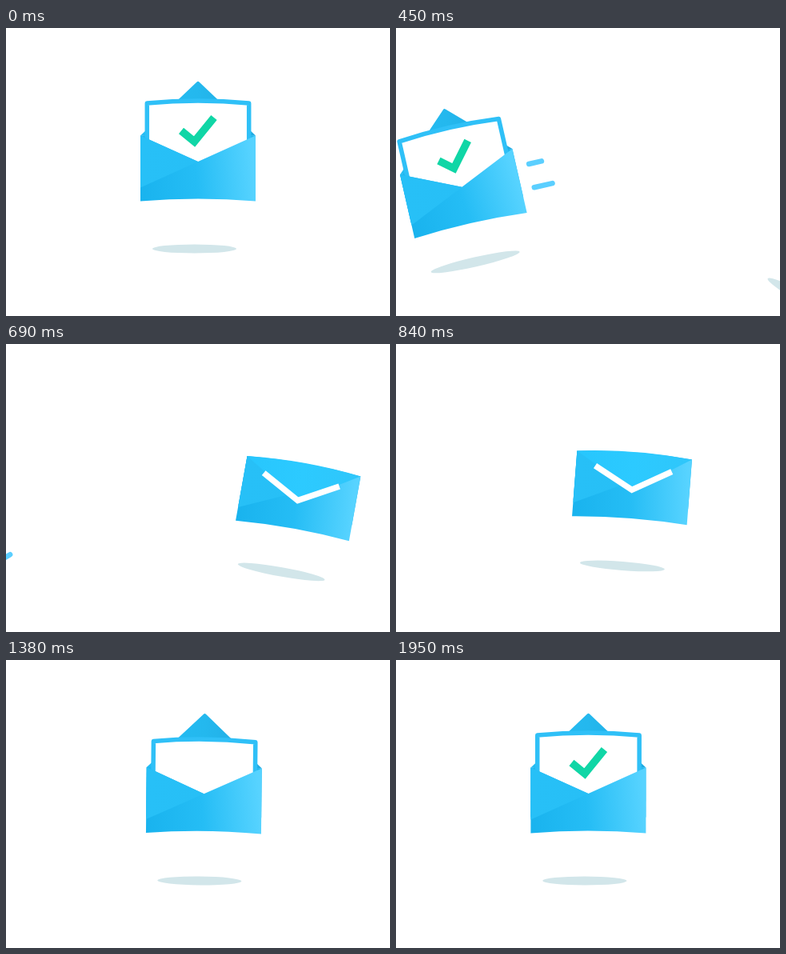
An HTML page with a canvas that plays this animation: 480 px wide and 360 px high, repeating every 1980 ms.

```html
<!DOCTYPE html>
<html>
<head>
<meta charset="utf-8">
<style>
html, body { margin: 0; width: 100%; height: 100%; overflow: hidden; background: #fff; }
canvas { display: block; }
</style>
</head>
<body>
<canvas id="stage" width="480" height="360"></canvas>
<script>
const ctx = document.getElementById('stage').getContext('2d');
const LOOP = 1980, SWAP = 540, GAP = 41.4;
const PIVOT_X = 240, PIVOT_Y = 890, BASE_Y = 216.5;

const ramp = (t, a, b) => Math.min(1, Math.max(0, (t - a) / (b - a)));
const smooth = p => p * p * (3 - 2 * p);
const mix = (a, b, p) => a + (b - a) * p;

function gradient(x0, y0, x1, y1, ...colors) {
  const g = ctx.createLinearGradient(x0, y0, x1, y1);
  colors.forEach((c, i) => g.addColorStop(i / (colors.length - 1), c));
  return g;
}
const bodyFill = gradient(-72, 0, 72, -12, '#19b3ee', '#25bdf5', '#57d3ff');
const sideFill = gradient(-72, 0, 0, 0, '#27c0f7', '#27bff6');
const flapFill = gradient(-72, 0, 72, 0, '#24bdf4', '#24b8ee', '#1fa9e1');
const lidFill = gradient(-72, 0, 72, 0, '#27c6fd', '#2ccaff', '#2fc6fa');

function poly(fill, ...pts) {
  ctx.beginPath();
  pts.forEach(p => p.length > 2 ? ctx.quadraticCurveTo(...p) : ctx.lineTo(...p));
  ctx.closePath();
  ctx.fillStyle = fill;
  ctx.fill();
}

function line(color, width, ...pts) {
  ctx.beginPath();
  pts.forEach(p => ctx.lineTo(...p));
  ctx.strokeStyle = color;
  ctx.lineWidth = width;
  ctx.stroke();
}

// Angle along the arc, in degrees; neighbours on the arc are GAP apart.
function angle(t) {
  if (t < SWAP) return angle(t + LOOP) + GAP;
  if (t >= LOOP + SWAP) return angle(t - LOOP) - GAP;
  if (t >= LOOP) return -21.2 * ((t - LOOP) / SWAP) ** 2.75;
  const d = t - SWAP, q = d / (LOOP - SWAP);
  return 19.4 * Math.exp(-((d / 196) ** 1.2)) + 0.8 * (1 - q * q);
}

function letter(t) {
  const top = mix(-77, -122.5, smooth(ramp(t, 880, 1560)));
  ctx.lineJoin = 'round';
  poly('#fff', [-63.7, -15], [-63.7, top], [0, top - 6, 63.7, top], [63.7, -15]);
  ctx.strokeStyle = '#2fc0f7';
  ctx.lineWidth = 5.5;
  ctx.stroke();

  const drawn = 1 - (1 - ramp(t, 1530, 1770)) ** 2;
  if (drawn > 0) {
    ctx.lineJoin = 'miter';
    ctx.setLineDash([60 * drawn, 100]);
    line('#10d6a6', 9.5, [-21, -88], [-4.5, -74.5], [20, -104.5]);
    ctx.setLineDash([]);
  }
}

function envelope(t) {
  const lift = mix(-44, 68, smooth(ramp(t, 870, 1140)));
  const tip = -82 - lift;

  if (lift > 0) poly(flapFill, [-72, -82], [-1.5, tip + 1], [0, tip - 0.5, 1.5, tip + 1], [72, -82]);
  poly('#20b6ef', [-72, -82], [0, -89, 72, -82], [72, -20], [-72, -20]);
  if (t > 870) letter(t);

  poly(bodyFill, [-72, -82], [0, -49.5], [72, -82], [72, 0], [0, -6, -72, 0]);
  poly(sideFill, [-72, -82], [0, -49.5], [-72, -17]);

  if (lift <= 0) {
    poly(lidFill, [-72, -82], [0, -90, 72, -82], [0, tip]);
    const s = -lift / 44;
    const end = -82 + 17 * s;
    ctx.lineJoin = 'miter';
    line('#fff', 7.5, [-48, end], [0, tip - 0.5], [48, end]);
  }

  const dash = smooth(ramp(t, LOOP + 360, LOOP + 510));
  if (dash > 0) {
    ctx.lineCap = 'round';
    line('#5bcfff', 6.5, [88, -59], [88 + 25 * dash, -59]);
    line('#5bcfff', 6.5, [88, -29], [88 + 36 * dash, -29]);
    ctx.lineCap = 'butt';
  }
}

function traveller(t) {
  const a = angle(t);
  if (Math.abs(a) > 38) return;
  ctx.save();
  ctx.translate(PIVOT_X, PIVOT_Y);
  ctx.rotate(a * Math.PI / 180);
  ctx.translate(0, BASE_Y - PIVOT_Y);
  const spread = 1 + 0.0005 * a * a;
  ctx.beginPath();
  ctx.ellipse(-4.5, 59.5, 52.5 * spread, 5.5 * spread, 0, 0, 7);
  ctx.fillStyle = '#d2e6ea';
  ctx.fill();
  // The envelope sinks towards the ground away from the middle.
  ctx.translate(0, (a < 0 ? 0.51 : 0.32) * Math.abs(a) ** 1.3);
  envelope(t);
  ctx.restore();
}

// 30 ms ticks; every sixth one is held twice as long.
function tick(ms) {
  const n = Math.floor(ms % LOOP / 30);
  return 30 * (n > 1 && n % 6 === 1 ? n - 1 : n);
}

function frame() {
  const t = tick(performance.now() - start);
  ctx.clearRect(0, 0, 480, 360);
  traveller(t);
  traveller(t + LOOP);
  requestAnimationFrame(frame);
}
const start = performance.now();
frame();
</script>
</body>
</html>
```
